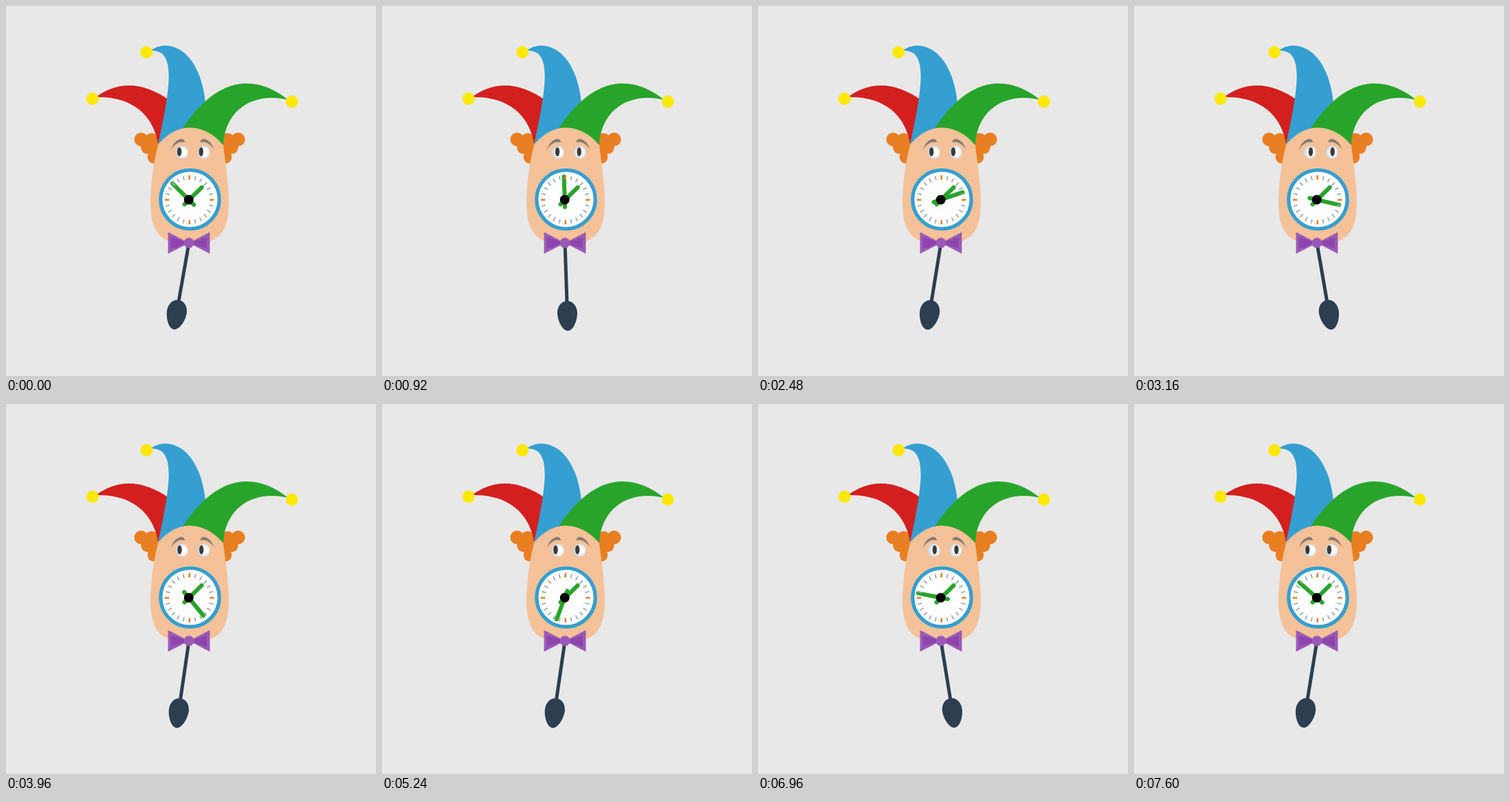
Write an HTML page that moves like this. It is 540 by 540 pixels and loops after 7640 ms.

```html
<!DOCTYPE html>
<html lang="en">
<head>
<meta charset="utf-8">
<title>Jester clock</title>
<style>
  html, body { margin: 0; width: 100%; height: 100%; overflow: hidden; background: #e8e8e8; }
  svg { display: block; width: 100vw; height: 100vh; }
</style>
</head>
<body>
<svg viewBox="0 0 540 540">
  <defs>
    <radialGradient id="ball" cx=".58" cy=".5" r=".55">
      <stop offset=".4" stop-color="#fff"/>
      <stop offset="1" stop-color="#c9cbcd"/>
    </radialGradient>
    <g id="hair" fill="#e87f22">
      <circle cx="197.2" cy="194.8" r="10"/>
      <circle cx="212.5" cy="195" r="9.5"/>
      <circle cx="206.5" cy="206.5" r="9.5"/>
      <circle cx="216" cy="220.500" r="9.5"/>
      <path d="M200 200L225 190V228L208 212Z"/>
    </g>
    <path id="brow" fill="#857a74" d="M240.500 210C244 200 250 194 256.500 194Q260.500 194.500 261 199C254 197 246 201 240.500 210Z"/>
    <g id="bow">
      <path fill="#9b59b6" d="M236.500 330V361.500L267 345.700Z"/>
      <path fill="#8e44ad" d="M241 338V354L267 345.700Z"/>
    </g>
  </defs>

  <use href="#hair"/>
  <use href="#hair" transform="matrix(-1 0 0 1 536 0)"/>

  <path fill="#d3201f" d="M131 133Q180 97 238 137L222 202C216 160 184 131 131 133Z"/>
  <path fill="#349fd0" d="M211 65C240 44 284 68 291 141L262 185L222 202C230 165 237 130 237.500 105C238 80 232 64 211 65Z"/>
  <path fill="#28a42b" d="M257 180C305 106 360 96 412 137C365 125 320 148 317 203L268 190Z"/>
  <g fill="#fbe804">
    <circle cx="126.300" cy="135.300" r="9"/>
    <circle cx="205" cy="67.500" r="9"/>
    <circle cx="417.300" cy="139.500" r="9"/>
  </g>

  <path fill="#f4c198" d="M222 202Q243 177.500 268 177.500Q296 178 317 203C321 235 325 258 325 287C325 325 313 345 283 345H253C223 345 211 325 211 287C211 258 215 230 222 202Z"/>

  <use href="#brow"/>
  <use href="#brow" transform="matrix(-1 0 0 1 544.500 0)"/>
  <g fill="url(#ball)">
    <ellipse cx="256.500" cy="213.500" rx="9.500" ry="10"/>
    <ellipse cx="288.300" cy="213.500" rx="9.500" ry="10"/>
  </g>
  <g id="pupils" fill="#3a3a3a">
    <ellipse cx="255.500" cy="212.700" rx="3.200" ry="6.500"/>
    <ellipse cx="287.300" cy="212.700" rx="3.200" ry="6.500"/>
  </g>

  <circle cx="268.500" cy="282.300" r="42.800" fill="#fff" stroke="#349fd0" stroke-width="5.200"/>
  <g stroke="#28a42b" stroke-linecap="round" stroke-width="6">
    <path d="M260.500 289.500L285.700 264.700"/>
    <path id="minute" d="M266.700 293.300V249"/>
  </g>
  <g id="ticks"/>
  <circle cx="266.700" cy="282.700" r="7"/>

  <g id="pendulum" fill="#2c3e50">
    <path d="M264.500 346H269.500V435H264.500Z"/>
    <path d="M267 430.500C276 430.500 281.500 439 281.500 448C281.500 459 275 474 267 474C259 474 252.500 459 252.500 448C252.500 439 258 430.500 267 430.500Z"/>
  </g>
  <use href="#bow"/>
  <use href="#bow" transform="matrix(-1 0 0 1 534 0)"/>
  <circle cx="267" cy="345.700" r="7.500" fill="#9b59b6"/>
</svg>
<script>
  const LOOP = 7640, STEP = 40;
  const TURN = 7680;   // one sweep of the minute hand
  const SWING = 1280;  // one full pendulum swing
  const byId = id => document.getElementById(id);
  const minute = byId('minute'), pendulum = byId('pendulum'), pupils = byId('pupils');

  for (let i = 0; i < 24; i++) {
    const tick = document.createElementNS('http://www.w3.org/2000/svg', 'path');
    const major = i % 6 === 0;
    tick.setAttribute('d', 'M267.7 247V253.300');
    tick.setAttribute('stroke', major ? '#e87f22' : '#a5afb0');
    tick.setAttribute('stroke-width', major ? 2.6 : 1.9);
    tick.setAttribute('transform', `rotate(${i * 15} 267.7 282.9)`);
    byId('ticks').append(tick);
  }

  function draw(now) {
    const t = Math.floor(now % LOOP / STEP) * STEP;
    const sway = -Math.cos(t / SWING * 2 * Math.PI);
    minute.setAttribute('transform', `rotate(${t / TURN * 360 - 45} 266.7 282.7)`);
    pendulum.setAttribute('transform', `rotate(${-10 * sway} 267 346)`);
    pupils.setAttribute('transform', `translate(${2.5 * sway})`);
    requestAnimationFrame(draw);
  }
  draw(performance.now());
</script>
</body>
</html>
```
